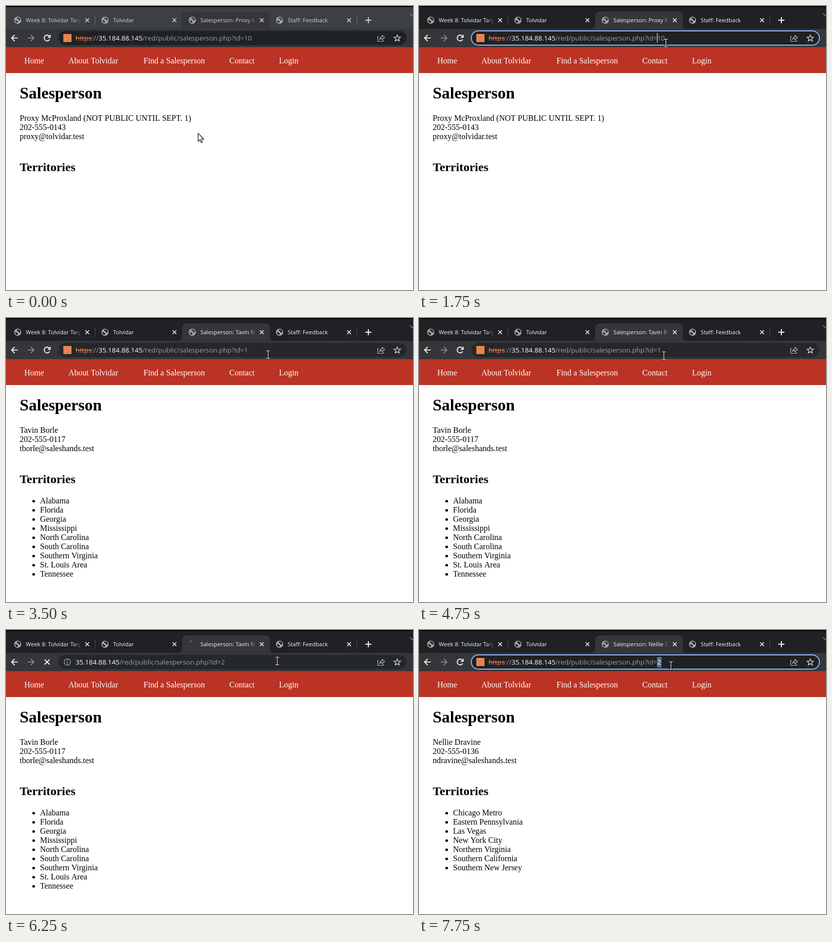
An HTML page with a canvas that plays this animation: 802 px wide and 559 px high, repeating every 8000 ms.

```html
<!DOCTYPE html>
<html lang="en">
<head>
<meta charset="utf-8">
<title>Salesperson lookup</title>
<style>
  html, body { margin: 0; width: 100%; height: 100%; overflow: hidden; background: #fff; }
  canvas { display: block; }
</style>
</head>
<body>
<canvas id="stage" width="802" height="559"></canvas>
<script>
const ctx = document.getElementById('stage').getContext('2d');
const LOOP = 8000, TICK = 250;
const UI = '"Open Sans", "Noto Sans", sans-serif';
const SERIF = '"Liberation Serif", serif';
const URL_FONT = `13.3px ${UI}`;
const TOOLBAR = '#35363a', GREY = '#9aa0a6', ORANGE = '#e8834f';

const people = [
  { name: 'Proxy McProxland', note: ' (NOT PUBLIC UNTIL SEPT. 1)', phone: '202-555-0143',
    mail: 'proxy@tolvidar.test', areas: [] },
  { name: 'Tavin Borle', note: '', phone: '202-555-0117', mail: 'tborle@saleshands.test',
    areas: ['Alabama', 'Florida', 'Georgia', 'Mississippi', 'North Carolina', 'South Carolina',
      'Southern Virginia', 'St. Louis Area', 'Tennessee'] },
  { name: 'Nellie Dravine', note: '', phone: '202-555-0136', mail: 'ndravine@saleshands.test',
    areas: ['Chicago Metro', 'Eastern Pennsylvania', 'Las Vegas', 'New York City',
      'Northern Virginia', 'Southern California', 'Southern New Jersey'] }
];

// time, person shown, address bar mode, id in the address
const steps = [
  [0, 0, 'idle', '10'], [1500, 0, 'caret', '10'], [2000, 0, 'select', '10'],
  [2250, 0, 'edit', '1'], [3000, 0, 'load', '1'], [3500, 1, 'idle', '1'],
  [5000, 1, 'select', '1'], [5250, 1, 'edit', '2'], [6000, 1, 'load', '2'],
  [6500, 2, 'idle', '2'], [7500, 2, 'caret', '2'], [7750, 2, 'select', '2']
];

// time, x, y of the pointer
const pointer = [
  [0, 378, 250], [250, 385, 232], [500, 408, 172], [750, 440, 108], [1000, 462, 74],
  [1250, 470, 68], [1750, 486, 73], [2000, 497, 75], [2250, 516, 72], [3750, 508, 73],
  [4000, 499, 74], [4250, 492, 74], [4500, 486, 74], [4750, 482, 74], [5000, 494, 74],
  [5250, 528, 71], [5500, 534, 61], [7000, 506, 68], [7250, 491, 72], [7500, 489, 71],
  [7750, 496, 70]
];

const latest = (list, t) => list.filter(item => item[0] <= t).pop();

function text(str, x, y, font, color) {
  ctx.font = font;
  ctx.fillStyle = color;
  ctx.fillText(str, x, y);
  return x + ctx.measureText(str).width;
}

function rect(x, y, w, h, color) {
  ctx.fillStyle = color;
  ctx.fillRect(x, y, w, h);
}

function line(points, color, width = 1.6) {
  ctx.beginPath();
  points.forEach(([x, y], i) => i ? ctx.lineTo(x, y) : ctx.moveTo(x, y));
  ctx.strokeStyle = color;
  ctx.lineWidth = width;
  ctx.stroke();
}

function arc(x, y, r, from, to, color, width = 1.6) {
  ctx.beginPath();
  ctx.arc(x, y, r, from, to);
  ctx.strokeStyle = color;
  ctx.lineWidth = width;
  ctx.stroke();
}

function polygon(points, color) {
  ctx.beginPath();
  points.forEach(([x, y]) => ctx.lineTo(x, y));
  ctx.closePath();
  ctx.fillStyle = color;
  ctx.fill();
}

function pill(x, y, w, h, color) {
  ctx.beginPath();
  ctx.roundRect(x, y, w, h, h / 2);
  ctx.fillStyle = color;
  ctx.fill();
}

function cross(x, y, r, color, width) {
  line([[x - r, y - r], [x + r, y + r]], color, width);
  line([[x + r, y - r], [x - r, y + r]], color, width);
}

function globe(x, y, back, color = '#a5a9ad') {
  ctx.beginPath();
  ctx.arc(x, y, 7, 0, Math.PI * 2);
  ctx.fillStyle = color;
  ctx.fill();
  polygon([[x - 5.5, y - 1], [x - 1, y + 1], [x + 1, y + 3], [x - 1, y + 5.5], [x - 4, y + 4]], back);
  polygon([[x - 1, y - 5.5], [x + 3.5, y - 5], [x + 5.5, y - 1], [x + 4, y + 1],
    [x + 1, y], [x + 2, y - 2], [x - 2, y - 2.5]], back);
}

function tab(x, title, back, ink, loadAge) {
  if (loadAge === null) globe(x, 28, back);
  else {
    const end = -Math.PI * 0.5;
    arc(x, 28, 6.5, end - 0.4 - loadAge / TICK * 0.5, end, '#777b80', 1.5);
  }
  ctx.save();
  ctx.beginPath();
  ctx.rect(x + 14, 14, 110, 28);
  ctx.clip();
  text(title, x + 16, 32, `500 11.2px ${UI}`, ink);
  const fade = ctx.createLinearGradient(x + 110, 0, x + 126, 0);
  fade.addColorStop(0, back + '00');
  fade.addColorStop(1, back);
  rect(x + 110, 14, 16, 28, fade);
  ctx.restore();
  cross(x + 137, 28, 3.7, ink, 1.6);
}

function drawTabs(person, active, loadAge) {
  const strip = active ? '#202124' : '#3c4043';
  const ink = active ? '#f1f3f4' : '#ced1d4';
  rect(0, 0, 802, 45, strip);
  rect(0, 0, 802, 2, '#000');
  ctx.beginPath();
  ctx.moveTo(339, 45);
  ctx.arcTo(347, 45, 347, 37, 8);
  ctx.arcTo(347, 11, 355, 11, 8);
  ctx.arcTo(520, 11, 520, 19, 8);
  ctx.arcTo(520, 45, 528, 45, 8);
  ctx.lineTo(528, 45);
  ctx.fillStyle = TOOLBAR;
  ctx.fill();
  tab(23, 'Week 8: Tolvidar Targets', strip, ink, null);
  tab(195, 'Tolvidar', strip, ink, null);
  tab(367, 'Salesperson: ' + person.name, TOOLBAR, ink, loadAge);
  tab(539, 'Staff: Feedback', strip, ink, null);
  for (const x of [175, 691]) rect(x, 18, 1, 20, active ? '#4a4d51' : '#6b6f73');
  line([[708, 28], [720, 28]], ink, 2);
  line([[714, 22], [714, 34]], ink, 2);
  line([[796, 15], [802, 20]], GREY, 1.2);
}

function drawButtons(loading) {
  const arrow = (x, dir, color) => {
    line([[x - 6.5 * dir, 63], [x + 6 * dir, 63]], color, 1.8);
    line([[x, 57], [x - 6 * dir, 63], [x, 69]], color, 1.8);
  };
  arrow(17, 1, '#f1f3f4');
  arrow(49, -1, '#85878a');
  if (loading) cross(81, 63, 5, '#f1f3f4', 1.8);
  else {
    arc(81, 63, 5.7, 0.5, Math.PI * 2 - 0.75, '#f1f3f4', 1.9);
    polygon([[88, 56], [88, 62.5], [81.5, 62.5]], '#f1f3f4');
  }
}

function drawBarIcons() {
  const color = '#b4b7bb';
  line([[735, 60], [732.5, 60], [732.5, 69.5], [744, 69.5], [744, 67]], color, 1.2);
  line([[736, 66], [737.5, 62], [741, 60.5], [741, 57.5], [746, 62], [741, 66.5],
    [741, 63.5], [738, 64.5], [736, 66]], color, 1.2);
  const star = Array.from({ length: 11 }, (_, i) => {
    const a = i * Math.PI / 5 - Math.PI / 2, r = i % 2 ? 2.9 : 6.7;
    return [771 + r * Math.cos(a), 63.5 + r * Math.sin(a)];
  });
  line(star, '#d0d3d6', 1.4);
}

function drawAddress(mode, id, hover) {
  const focused = ['caret', 'select', 'edit'].includes(mode);
  const loading = mode === 'load';
  const back = hover && !focused ? '#26272a' : '#202124';
  if (focused) {
    pill(102, 48, 688, 30, '#8ab4f8');
    pill(104, 50, 684, 26, back);
  } else pill(103, 49, 686, 28, back);

  let x = 137;
  if (loading) {
    arc(121, 63, 6.3, 0, Math.PI * 2, GREY, 1.4);
    rect(120.2, 62, 1.6, 4.5, GREY);
    rect(120.2, 59, 1.6, 1.7, GREY);
  } else if (mode === 'edit') {
    globe(121, 63, back, GREY);
    x = text('https://', x, 68, URL_FONT, GREY);
  } else {
    rect(113, 55, 16, 16, ORANGE);
    const end = text('https', x, 68, URL_FONT, ORANGE);
    line([[x, 63.5], [end, 63.5]], ORANGE, 1.2);
    x = text(':', end, 68, URL_FONT, ORANGE);
    x = text('//', x, 68, URL_FONT, GREY);
  }
  x = text('35.184.88.145', x, 68, URL_FONT, '#fff');
  x = text('/red/public/salesperson.php?id=', x, 68, URL_FONT, GREY);
  const idEnd = x + ctx.measureText(id).width;
  if (mode === 'select') rect(Math.round(x), 53, Math.round(idEnd - x) + 1, 21, '#536f99');
  text(id, x, 68, URL_FONT, mode === 'select' ? '#fff' : GREY);
  if (mode === 'caret') rect(Math.round(x), 53, 1, 19, '#fff');
  if (mode === 'edit') rect(Math.round(idEnd) + 1, 53, 1, 19, '#fff');
  drawBarIcons();
}

function drawPage({ name, note, phone, mail, areas }) {
  const body = `16px ${SERIF}`;
  rect(0, 81, 802, 478, '#fff');
  rect(0, 81, 802, 51, '#bb3324');
  [['Home', 36], ['About Tolvidar', 123], ['Find a Salesperson', 271], ['Contact', 440], ['Login', 538]]
    .forEach(([label, x]) => text(label, x, 113, body, '#fff'));
  text('Salesperson', 27, 182, `bold 32px ${SERIF}`, '#000');
  [name + note, phone, mail].forEach((row, i) => text(row, 27, 226 + 18 * i, body, '#000'));
  text('Territories', 27, 325, `bold 24px ${SERIF}`, '#000');
  areas.forEach((area, i) => {
    const y = 365 + 18 * i;
    ctx.beginPath();
    ctx.arc(54.5, y - 4.5, 2.6, 0, Math.PI * 2);
    ctx.fill();
    text(area, 67, y, body, '#000');
  });
}

function drawPointer(x, y) {
  if (y < 82) {
    for (const [color, width] of [['#000', 3], ['#fff', 1.2]]) {
      line([[x + 0.5, y - 7], [x + 0.5, y + 7]], color, width);
      for (const edge of [-7.5, 7.5]) line([[x - 3, y + edge], [x + 4, y + edge]], color, width);
    }
    return;
  }
  const shape = [[0, 0], [0, 16], [3.7, 12.5], [6.2, 18.5], [8.7, 17.4], [6.2, 11.5], [11.3, 11.5], [0, 0]]
    .map(([dx, dy]) => [x + 0.5 + dx, y + 0.5 + dy]);
  polygon(shape, '#fff');
  line(shape, '#000', 1.1);
}

function draw(now) {
  const t = Math.floor(now % LOOP / TICK) * TICK;
  const [since, index, mode, id] = latest(steps, t);
  const [, x, y] = latest(pointer, t);
  const loading = mode === 'load';
  drawTabs(people[index], t >= 1500, loading ? t - since : null);
  rect(0, 45, 802, 36, TOOLBAR);
  drawButtons(loading);
  drawAddress(mode, id, y < 78);
  drawPage(people[index]);
  drawPointer(x, y);
}

const start = performance.now();
function frame() {
  draw(performance.now() - start);
  requestAnimationFrame(frame);
}
frame();
</script>
</body>
</html>
```
